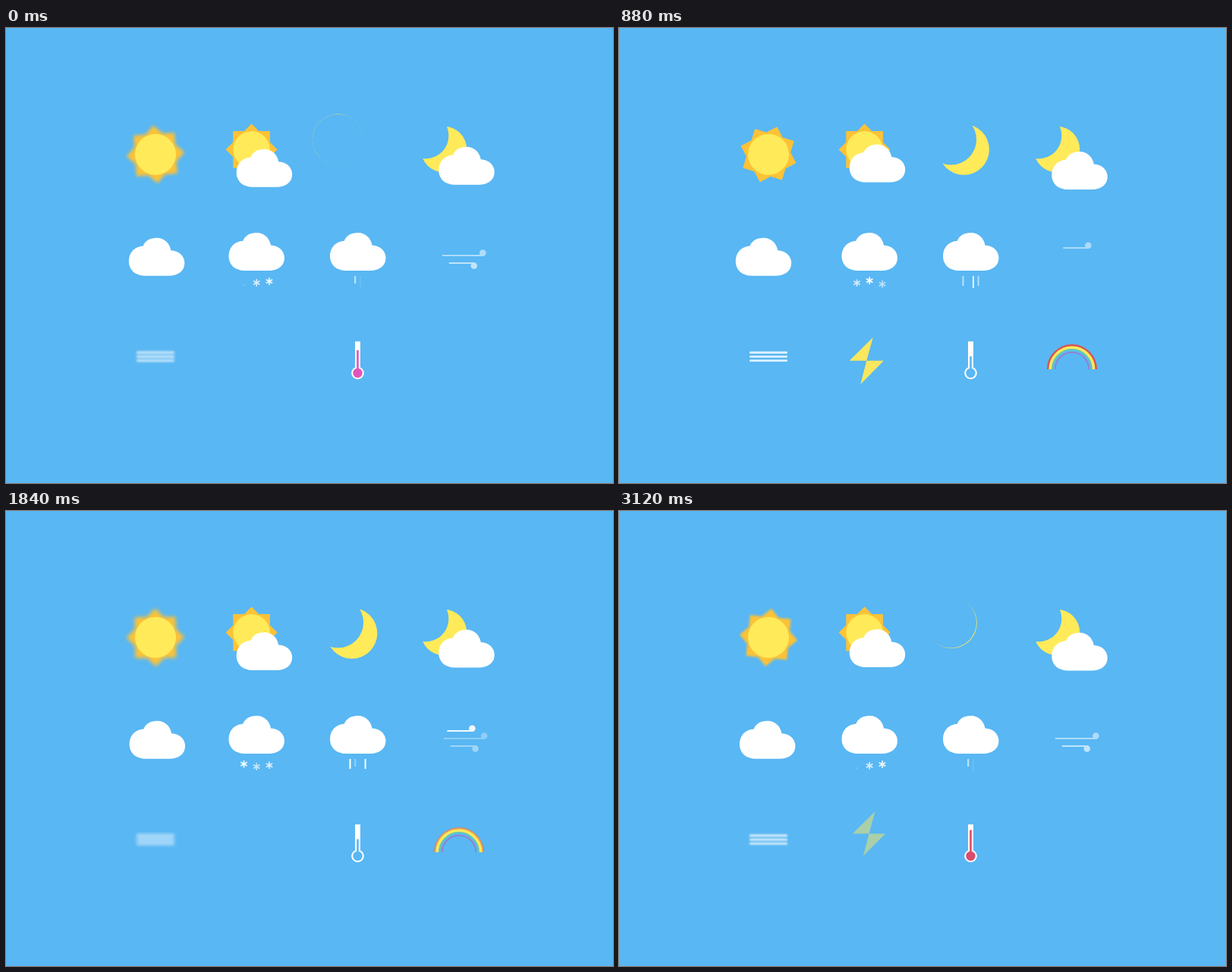
Animation of 800 by 600 pixels, one loop 3.2 s. Source, as an HTML page:

```html
<!DOCTYPE html>
<html lang="en">
<head>
<meta charset="utf-8">
<title>Weather icons</title>
<style>
  html, body { margin: 0; width: 100%; height: 100%; overflow: hidden; background: #59b7f3; }
  svg { display: block; width: 800px; height: 600px; }
</style>
</head>
<body>
<svg viewBox="0 0 800 600" xmlns="http://www.w3.org/2000/svg">
  <defs>
    <path id="cloud" fill="#fff" d="M0 31C0 19 8 11.5 18.8 10.8C21 4 28 0 37 0C46.500 0 54 7 55.500 16.500C66 17 73.500 24 73.500 33C73.500 43 66 50 52 50H22C8 50 0 42 0 31Z"/>
    <path id="flake" d="M0-4.800V4.800M-4.200-2.400L4.200 2.400M-4.200 2.400L4.200-2.400" stroke="#fff" stroke-width="1.7"/>
    <filter id="sunBlur" filterUnits="userSpaceOnUse" x="-60" y="-60" width="120" height="120" color-interpolation-filters="sRGB"><feGaussianBlur/></filter>
    <filter id="fogBlur" filterUnits="userSpaceOnUse" x="150" y="405" width="95" height="57" color-interpolation-filters="sRGB"><feGaussianBlur/></filter>
  </defs>
  <rect width="800" height="600" fill="#59b7f3"/>

  <g transform="translate(197 166.700)">
    <g filter="url(#sunBlur)">
      <g id="rays" fill="#fdc236">
        <rect x="-27" y="-27" width="54" height="54"/>
        <rect x="-27" y="-27" width="54" height="54" transform="rotate(45)"/>
      </g>
    </g>
    <circle r="27" fill="#ffea59"/>
  </g>

  <g transform="translate(323.600 160.300)">
    <g fill="#fdc236">
      <rect x="-24.300" y="-24.300" width="48.600" height="48.600"/>
      <rect x="-24" y="-24" width="48" height="48" transform="rotate(45)"/>
    </g>
    <circle r="24.200" fill="#ffea59"/>
  </g>
  <use id="sunCloud" href="#cloud"/>

  <circle id="moon" r="33.500" fill="#ffea59"/>
  <circle cx="437.500" cy="147" r="33.600" fill="#59b7f3"/>

  <circle cx="577" cy="160" r="30.300" fill="#ffea59"/>
  <circle cx="553" cy="142" r="30.400" fill="#59b7f3"/>
  <use id="moonCloud" href="#cloud"/>

  <use id="driftCloud" href="#cloud"/>
  <use href="#cloud" x="293.500" y="270"/>
  <use href="#cloud" x="427" y="270"/>
  <g id="snow"></g>
  <g id="rain"></g>
  <g id="wind"></g>

  <g filter="url(#fogBlur)" fill="#fff" fill-opacity=".8">
    <rect x="172" y="426.600" width="50" height="2.800" rx="1"/>
    <rect x="172" y="431.900" width="50" height="2.800" rx="1"/>
    <rect x="172" y="437.200" width="50" height="2.800" rx="1"/>
  </g>

  <path id="bolt" fill="#ffea59" d="M8.500-31L-22.800 0H22.800L-8 31L0 0Z"/>

  <g fill="#fff">
    <rect x="460" y="413.300" width="7" height="40"/>
    <circle cx="463.500" cy="455" r="8.300"/>
  </g>
  <g id="mercury">
    <rect id="level" x="462.200" width="2.600"/>
    <circle cx="463.500" cy="455" r="6.200"/>
  </g>

  <g id="rainbow" fill="none"></g>
</svg>
<script>
const STEP = 80, LOOP = 3200, FALL = 1560;
const $ = id => document.getElementById(id);
const clamp = (v, lo = 0, hi = 1) => Math.min(hi, Math.max(lo, v));
const fract = v => v - Math.floor(v);
const put = (el, attrs) => { for (const k in attrs) el.setAttribute(k, attrs[k]); };
const move = (el, x, y, rest = '') => put(el, { transform: `translate(${x} ${y}) ${rest}` });

function add(parent, tag, attrs) {
  const el = document.createElementNS('http://www.w3.org/2000/svg', tag);
  put(el, attrs);
  return parent.appendChild(el);
}

// Triangle wave: 0 at `start`, 1 half a period later.
const tri = (t, start, period) => 1 - Math.abs(1 - 2 * fract((t - start) / period));

// Linear interpolation between rows of [position, ...values].
function track(rows, at) {
  const i = Math.max(1, rows.findIndex(r => r[0] >= at));
  const a = rows[i - 1], b = rows[i];
  const k = clamp((at - a[0]) / (b[0] - a[0]));
  return a.slice(1).map((v, n) => v + (b[n + 1] - v) * k);
}

const flakes = [[313.5, .93], [330.2, .45], [347, .17]].map(([x, phase]) =>
  ({ x, phase, el: add($('snow'), 'use', { href: '#flake' }) }));

const drops = [[453.5, 13, .84], [460.2, 10, .35], [466.9, 16, .67], [473.6, 13, .87]].map(([x, h, phase]) =>
  ({ phase, el: add($('rain'), 'rect', { x: x - 1, y: 327, width: 2, height: h, fill: '#fff' }) }));

const gusts = [[613.7, 290, 33, -3.2, .89], [624, 300, 53.5, -3.5, .43], [613.3, 310, 33, 3.5, .34]].map(
  ([x, y, length, lift, phase]) => {
    const el = add($('wind'), 'g', { fill: '#fff' });
    add(el, 'rect', { x: -length, y: -1, width: length + 1, height: 2 });
    add(el, 'circle', { cy: lift, r: 4.3 });
    return { x, y, phase, el };
  });

// Radius, width, colour and half of the visible time of each band.
const bands = [[22.3, 1.7, '#a274cd', 1150], [25.9, 2, '#62c6b4', 840], [29.7, 5.5, '#ffea59', 840], [31.8, 2.5, '#d2555a', 640]].map(
  ([r, width, stroke, span]) => ({
    span,
    el: add($('rainbow'), 'path', { d: `M${597 - r} 450A${r} ${r} 0 0 1 ${597 + r} 450`, stroke, 'stroke-width': width })
  }));

// Time, x, y, scale, opacity
const boltTrack = [
  [0, 330, 422, .9, 0], [365, 324.7, 438, 1, .9], [420, 324.7, 440, 1, 1],
  [560, 328.2, 440, 1, 1], [765, 325.4, 440, 1, 1], [850, 326, 440, 1, 1],
  [1200, 329.2, 426, .95, .5], [1245, 329.5, 425.5, .95, .48], [1640, 330, 422, .9, 0], [1875, 330, 422, .9, 0]
];
const heatTrack = [
  [0, 89, 183, 243], [60, 89, 183, 243], [310, 169, 146, 231],
  [430, 184, 136, 228], [830, 226, 85, 192], [1310, 218, 75, 108]
];

function drawSky(t) {
  const drift = tri(t, 880, 2800);
  document.querySelector('#sunBlur feGaussianBlur').setAttribute('stdDeviation', .2 + 3.4 * drift);
  document.querySelector('#fogBlur feGaussianBlur').setAttribute('stdDeviation', .2 + 2.6 * drift);
  put($('rays'), { transform: `rotate(${-4 + .0752 * t})` });
  move($('driftCloud'), 153.7 + 13 * drift, 276.7);

  const bob = 153.5 + 6.7 * tri(t, 880, 1875);
  move($('sunCloud'), 303.7, bob);
  move($('moonCloud'), 570.3, 316.5 - bob);

  const shift = -2.9 + 29.9 * tri(t, -140, 3070);
  put($('moon'), { cx: 437.5 + shift, cy: 147 + .78 * shift });
}

function drawFalling(t) {
  for (const f of flakes) {
    const p = fract(t / FALL + f.phase);
    move(f.el, f.x, 333 + 6.5 * p, `scale(${clamp((.92 - p) / .1, .2, 1)})`);
    put(f.el, { opacity: 1 - .55 * p });
  }
  for (const d of drops) {
    const p = fract(t / FALL + d.phase);
    put(d.el, { opacity: 1 - clamp(p / .72) ** 1.5 });
  }
  for (const g of gusts) {
    const p = fract(t / FALL + g.phase);
    move(g.el, g.x + 10.3 * p, g.y);
    put(g.el, { opacity: clamp(1 - p / .9) });
  }
}

function drawBottomRow(t) {
  const [x, y, scale, opacity] = track(boltTrack, t % 1875);
  move($('bolt'), x, y, `scale(${scale})`);
  put($('bolt'), { opacity });

  const heat = Math.max(0, Math.abs(t - 1340) - 470);
  const top = 433 - .0094 * heat;
  put($('level'), { y: top, height: 455 - top });
  put($('mercury'), { fill: `rgb(${track(heatTrack, Math.min(heat, 1310)).map(Math.round)})` });

  for (const b of bands) put(b.el, { opacity: clamp((b.span - Math.abs(t - 1250)) / 100) });
}

const started = performance.now();
function frame() {
  const t = Math.floor((performance.now() - started) / STEP) * STEP % LOOP;
  drawSky(t);
  drawFalling(t);
  drawBottomRow(t);
  requestAnimationFrame(frame);
}
frame();
</script>
</body>
</html>
```
